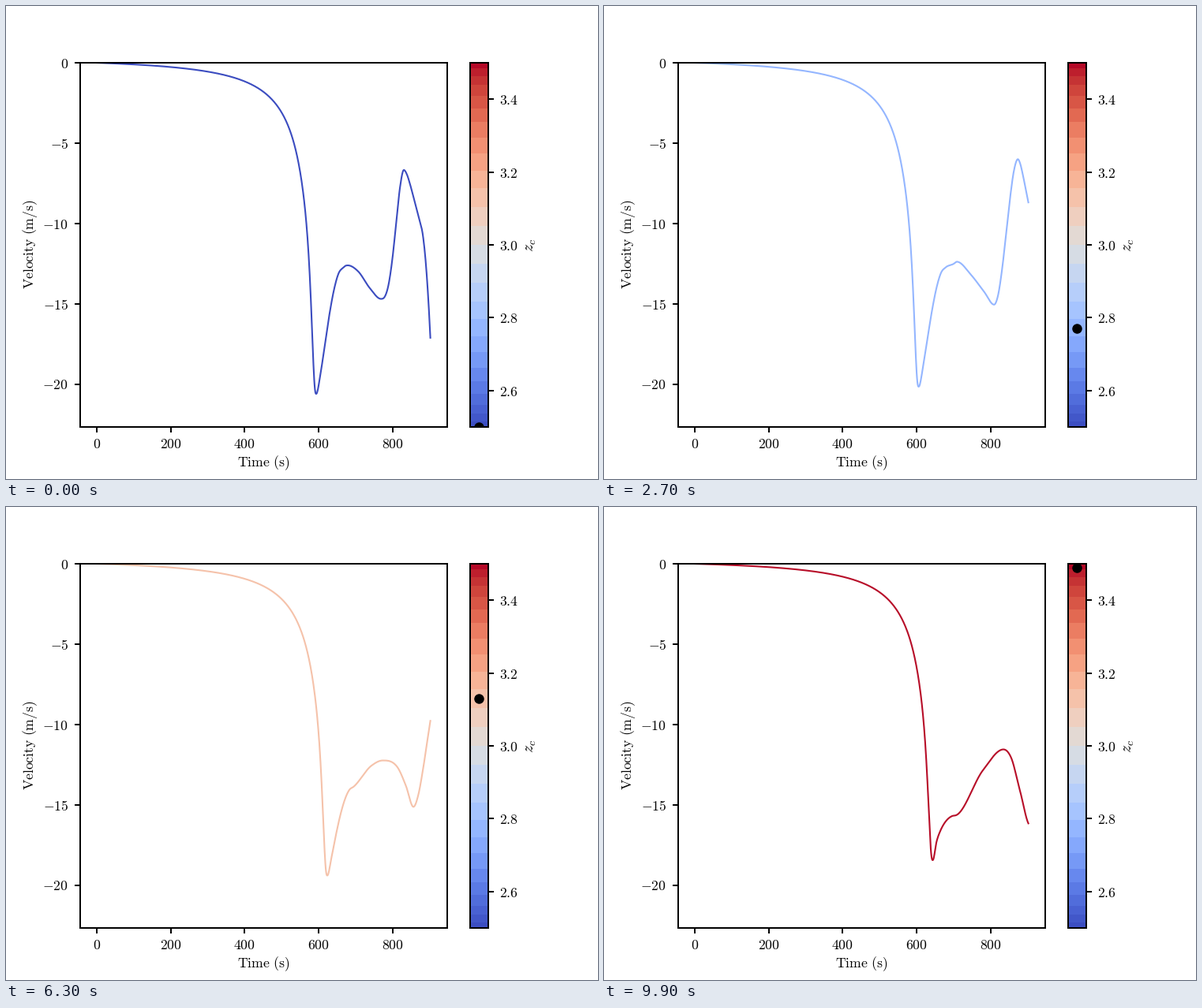
A matplotlib script that plays this animation: 750x600 px, repeating every 10 s.

```python
import numpy as np
import matplotlib.pyplot as plt
from matplotlib.animation import FuncAnimation

W, H, DPI = 750, 600, 150
FRAMES, INTERVAL = 100, 100
X0, X1, TOP, BOTTOM = 114.89, 537.6, 72, 534   # data area on the canvas, px
PX_T, PX_V = 0.4683, 20.375                    # px per second, px per m/s

plt.rcParams.update({
    "mathtext.fontset": "cm", "font.size": 8.5, "axes.linewidth": .96,
    "xtick.major.width": .96, "ytick.major.width": .96, "xtick.major.pad": 2.6,
})

# Four evenly spaced poses of the landmarks: dip, shoulder, climb, bump,
# two points of descent, second dip, second peak
POSES = np.array([
    [(393, 492), (427, 332), (430, 329.6), (433, 329),
     (446, 336.5), (461, 358), (475, 371.5), (504, 208)],
    [(400, 480.6), (434, 334), (446, 327), (451.5, 324),
     (470, 340), (486, 361.5), (498, 379), (529, 194)],
    [(407.8, 466), (441, 357.5), (464.5, 328.5), (480, 321),
     (498, 328.5), (508.5, 353), (518, 381), (555, 218)],
    [(416.5, 448), (446, 391), (480, 334), (506, 307.5),
     (516, 318.5), (527, 360), (540, 404), (580, 300)],
])
PATHS = np.polyfit(np.linspace(0, 1, 4), POSES.reshape(4, -1), 3)


def smooth(x, px, py):
    """Cubic Hermite curve through points, flat at extrema, no overshoot."""
    h = np.diff(px)
    d = np.diff(py) / h
    m = np.zeros_like(px)
    m[-1] = d[-1]
    inner = (h[1:] * d[:-1] + h[:-1] * d[1:]) / (h[1:] + h[:-1])
    cap = 3 * np.minimum(abs(d[:-1]), abs(d[1:]))
    m[1:-1] = np.where(d[:-1] * d[1:] > 0, np.clip(inner, -cap, cap), 0)
    i = np.clip(np.searchsorted(px, x) - 1, 0, len(h) - 1)
    s = (x - px[i]) / h[i]
    return (py[i] * (1 + 2 * s) * (1 - s) ** 2 + py[i + 1] * s * s * (3 - 2 * s)
            + h[i] * s * (1 - s) * (m[i] * (1 - s) - m[i + 1] * s))


def plunge(d, width):
    """Share of the dip's depth reached at distance d before it."""
    return 1 / (1 + (d / width) ** 1.25 * (1 - np.exp(-(d / 5) ** 1.5)))


def rise(a, b, power):
    """Eased points strictly between a and b."""
    u = np.arange(1, 6)[:, None] / 6
    s = u ** power
    return a + (b - a) * np.hstack([u, s * s * (3 - 2 * s)])


def drop(peak, squeeze):
    """Steady fall after the second peak that ends in a plunge."""
    d = np.arange(4, 45, 4)
    y = 3.4 * d * (1 - np.exp(-d / 7)) + .74 * np.maximum(0, d - 22) ** 2
    return peak + np.column_stack([d * squeeze, y])


def velocity(k):
    q = k / (FRAMES - 1)
    marks = np.polyval(PATHS, q).reshape(-1, 2) if PATHS.ndim == 1 else \
        (q ** np.arange(3, -1, -1) @ PATHS).reshape(-1, 2)
    dip, peak = marks[0], marks[-1]

    width = 12.1 + .9 * q
    rest = plunge(dip[0] - X0, width)
    share = plunge(np.maximum(dip[0] - grid, 0), width)
    fall = TOP + (dip[1] - TOP) * (share - rest) / (1 - rest)

    px, py = np.vstack([
        dip, rise(dip, marks[1], .75 - .3 * q ** 3), marks[1:-1],
        rise(marks[-2], peak, .93 + .5 * np.exp(-k / 18)), peak,
        drop(peak, 1 - .9 * q),
    ]).T
    y = np.where(grid < dip[0], fall, smooth(grid, px, py))
    return (TOP - y) / PX_V


grid = np.linspace(X0, X1, 900)
time = (grid - X0) / PX_T
span = (X1 - X0) / PX_T

fig = plt.figure(figsize=(W / DPI, H / DPI), dpi=DPI, facecolor="white")


def label(x, y, text, **kw):
    fig.text(x / W, 1 - y / H, text, ha="center", va="center", **kw)


ax = fig.add_axes([.125, .11, .62, .77])
ax.set_xlim(-.05 * span, 1.05 * span)
ax.set_ylim((TOP - BOTTOM) / PX_V, 0)
ax.set_xticks(range(0, 801, 200), [f"${t}$" for t in range(0, 801, 200)])
ax.set_yticks(range(-20, 1, 5), [f"${v}$" for v in range(-20, 1, 5)])
label(326, 579.5, r"$\mathrm{Time\ (s)}$")
label(31, 302.5, r"$\mathrm{Velocity\ (m/s)}$", rotation=90)

# Colour scale in steps that widen towards the middle
bar = fig.add_axes([.78375, .11, .0308, .77])
bend = .42 * np.pi
edges = 3 + .5 * np.sin(bend * np.linspace(-1, 1, 27)) / np.sin(bend)
mids = (edges[1:] + edges[:-1]) / 2
bar.pcolormesh([0, 1], edges, mids[:, None], cmap="coolwarm", vmin=2.5, vmax=3.5)
bar.set_xlim(0, 1)
bar.set_ylim(2.5, 3.5)
bar.set_xticks([])
bar.yaxis.tick_right()
ticks = np.arange(2.6, 3.5, .2)
bar.set_yticks(ticks, [f"${z:.1f}$" for z in ticks])
label(665, 303, "$z_c$", rotation=90, fontsize=9.5)

curve, = ax.plot([], [], lw=1)
dot, = bar.plot([.5], [2.5], "o", color="black", ms=6, mew=0)


def update(k):
    curve.set_data(time, velocity(k))
    curve.set_color(plt.cm.coolwarm(k / FRAMES))
    dot.set_ydata([2.5 + k / FRAMES])
    return curve, dot


anim = FuncAnimation(fig, update, frames=FRAMES, interval=INTERVAL, repeat=True)
plt.show()
```
